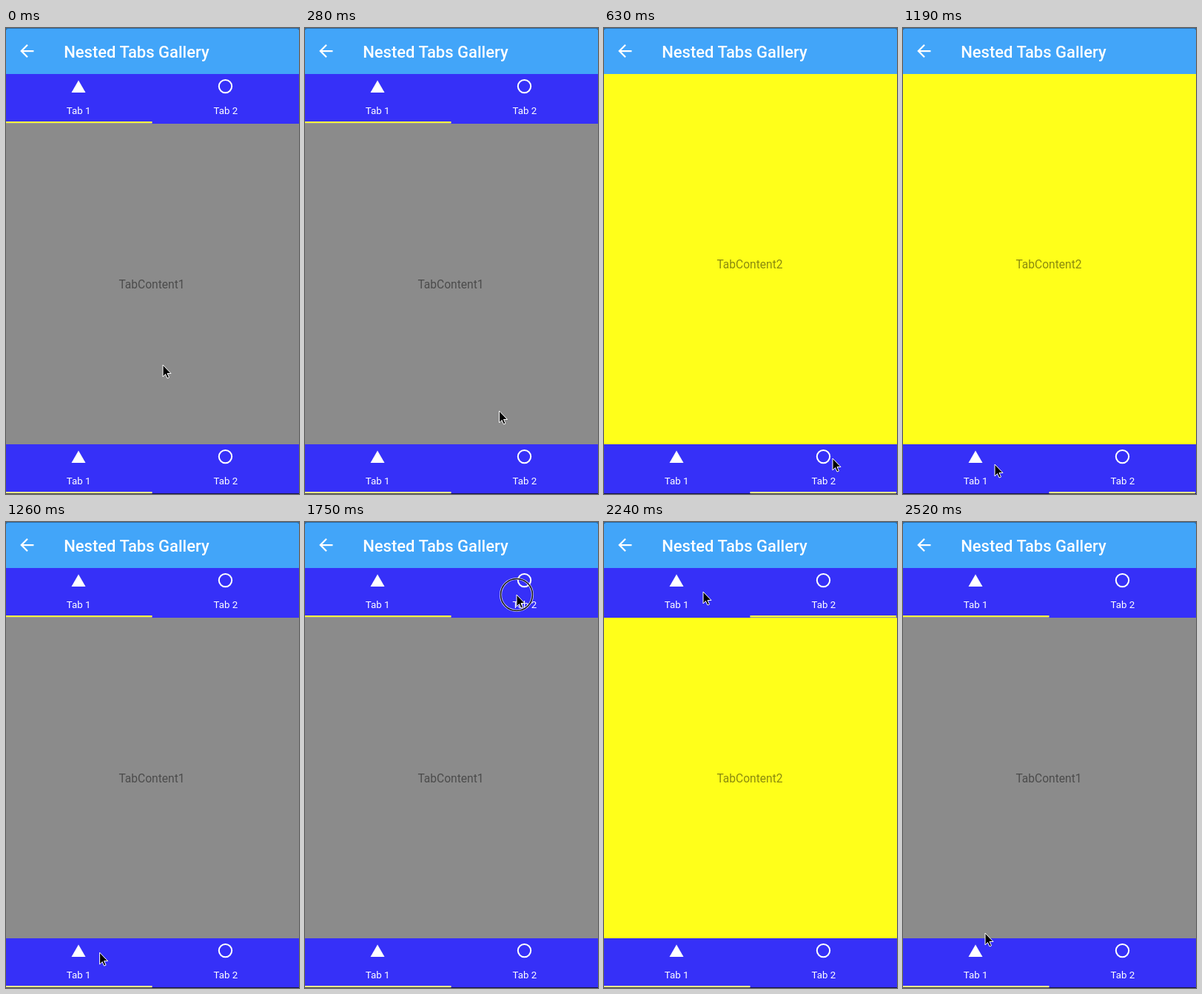
These frames come from a looping animation (396x628 px, 2590 ms). An HTML page:

```html
<!DOCTYPE html>
<html lang="en">
<head>
<meta charset="utf-8">
<title>Nested Tabs Gallery</title>
<style>
html, body { margin: 0; width: 100%; height: 100%; overflow: hidden; background: #111; }
svg { display: block; width: 396px; height: 628px; font-family: Roboto, sans-serif; }
</style>
</head>
<body>
<svg viewBox="0 0 396 628">
  <defs>
    <g id="tabs">
      <rect width="396" height="67" fill="#3630f8"/>
      <path d="M98 8.500 107.500 25H88.500Z" fill="#fff"/>
      <circle cx="296.500" cy="16.600" r="8.700" fill="none" stroke="#fff" stroke-width="2"/>
      <g fill="#fff" font-size="13.3">
        <text x="81.800" y="54">Tab 1</text>
        <text x="280.600" y="54">Tab 2</text>
      </g>
    </g>
  </defs>
  <rect id="page" y="62" width="396" height="499"/>
  <text id="label" x="152.400" font-size="15.6" fill="#000" fill-opacity=".46"></text>
  <g id="inner">
    <use href="#tabs" y="62"/>
    <rect id="innerBar" y="126" width="197.500" height="2.500" fill="#ffff3c"/>
  </g>
  <use href="#tabs" y="561"/>
  <rect y="627" width="396" height="1" fill="#17153f"/>
  <rect id="outerBar" y="625" width="197.500" height="2.200" fill="#ffff8c"/>
  <rect width="396" height="62" fill="#42a5f9"/>
  <path d="M0 0H396V3Q395 1 393 1H3Q1 1 0 3Z" fill="#2c6ca6"/>
  <path transform="translate(15.5 17.5) scale(1.125)" d="M19.500 12H5.500M12 4.700 4.700 12 12 19.300"
    fill="none" stroke="#fff" stroke-width="2"/>
  <text x="78.200" y="40" font-size="22" font-weight="500" fill="#fff">Nested Tabs Gallery</text>
  <g id="cursor">
    <g id="ring" fill="none">
      <circle r="21.500" stroke="#fff" stroke-opacity=".75" stroke-width="3.2"/>
      <circle r="21.500" stroke="#111" stroke-width="1.5"/>
    </g>
    <path d="M0 0V16L3.500 12.500 6 18 8.500 17 6 11.500H11Z"
      fill="#000" stroke="#fff" stroke-width="1" stroke-linejoin="round"/>
  </g>
</svg>
<script>
const LOOP = 2590, STEP = 70;
const $ = id => document.getElementById(id);
const set = (id, name, value) => $(id).setAttribute(name, value);

// Cursor stops: time, x, y
const stops = [
  [0, 212, 454], [560, 313, 578], [630, 309, 580], [1190, 124, 588],
  [1750, 286, 98], [2240, 134, 94], [2520, 111, 554]
];
const taps = { outer: [560, 1190], inner: [1750, 2240] };

const ease = u => u * u * u * (10 + u * (6 * u - 15));

function cursorAt(t) {
  const i = Math.max(1, stops.findIndex(s => s[0] >= t));
  const a = stops[i - 1], b = stops[i];
  const u = ease((t - a[0]) / (b[0] - a[0]));
  return [1, 2].map(k => a[k] + (b[k] - a[k]) * u);
}

// Each tap takes effect one step later.
const onSecond = (t, [open, close]) => t > open && t <= close;

function draw(t) {
  const outer = onSecond(t, taps.outer), inner = onSecond(t, taps.inner);
  const second = outer || inner;
  set("page", "fill", second ? "#ffff1a" : "#8b8b8b");
  $("label").textContent = second ? "TabContent2" : "TabContent1";
  set("label", "y", outer ? 324 : 350.5);
  set("inner", "visibility", outer ? "hidden" : "visible");
  set("innerBar", "x", inner ? 197.5 : 0);
  set("outerBar", "x", outer ? 197.5 : 0);
  set("ring", "visibility", t === taps.inner[0] ? "visible" : "hidden");
  set("cursor", "transform", `translate(${cursorAt(t)})`);
}

const start = performance.now();
function tick(now) {
  const t = Math.max(0, now - start) % LOOP;
  draw(Math.floor(t / STEP) * STEP);
  requestAnimationFrame(tick);
}
draw(0);
requestAnimationFrame(tick);
</script>
</body>
</html>
```
